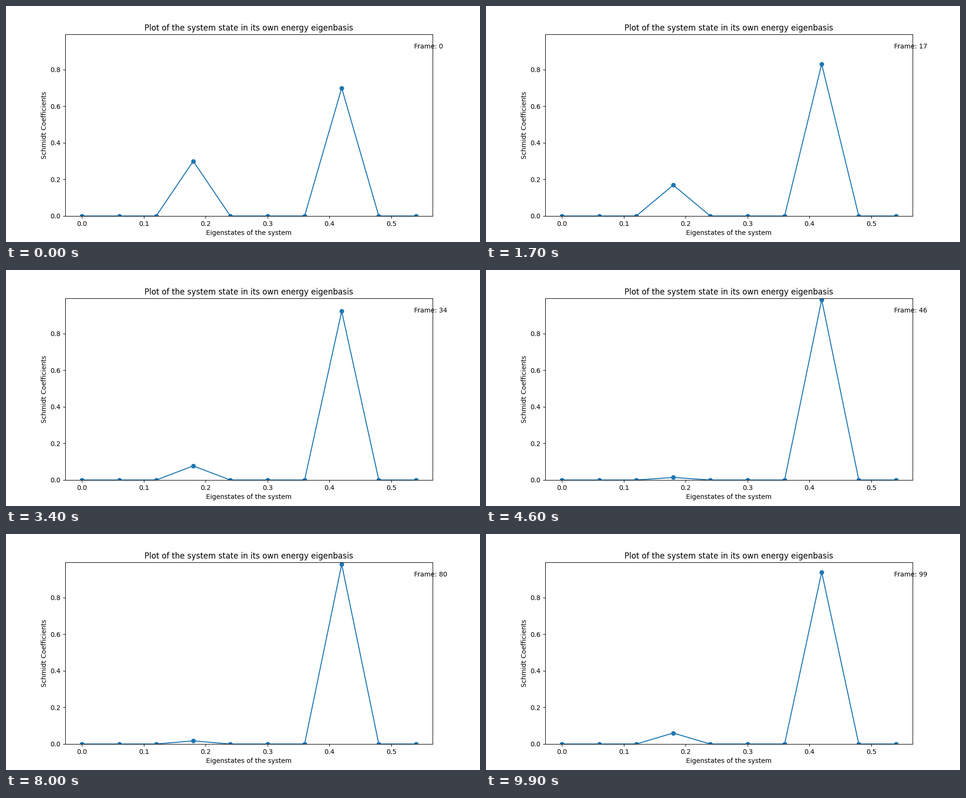
These frames come from a looping animation (1000 px wide and 500 px high, 10000 ms). A matplotlib script:

```python
import numpy as np
import matplotlib.pyplot as plt
from matplotlib.animation import FuncAnimation

FRAMES = 100
LEVELS = 10
GAP = 0.06
LOW, HIGH = 3, 7  # the two occupied eigenstates

# key points of the lower state's population, joined by a smooth curve
TIMES = np.array([0, 11, 17, 34, 46, 50, 60, 65, 74, 80, 99])
POPULATIONS = np.array([0.3, 0.236, 0.1693, 0.0772, 0.0143, 0.0066,
                        0.041, 0.0384, 0.009, 0.0175, 0.0602])
SLOPES = np.gradient(POPULATIONS, TIMES, edge_order=2)
SLOPES[0] = 0  # the state starts at rest


def population(t):
    i = min(np.searchsorted(TIMES, t, side="right"), len(TIMES) - 1)
    h = TIMES[i] - TIMES[i - 1]
    s = (t - TIMES[i - 1]) / h
    ease = s * s * (3 - 2 * s)
    return (POPULATIONS[i - 1] * (1 - ease) + POPULATIONS[i] * ease
            + h * s * (1 - s) * ((1 - s) * SLOPES[i - 1] - s * SLOPES[i]))


def coefficients(t):
    c = np.zeros(LEVELS)
    c[LOW] = population(t)
    c[HIGH] = 1 - c[LOW]
    return c


energies = GAP * np.arange(LEVELS)

fig, ax = plt.subplots(figsize=(10, 5), dpi=100)
line, = ax.plot(energies, coefficients(0), marker="o", color="#1f77b4")
ax.set_ylim(0, 1 - POPULATIONS.min())
ax.set_title("Plot of the system state in its own energy eigenbasis")
ax.set_xlabel("Eigenstates of the system")
ax.set_ylabel("Schmidt Coefficients")
label = ax.text(0.95, 0.95, "Frame: 0", transform=ax.transAxes,
                ha="left", va="top")


def update(t):
    line.set_ydata(coefficients(t))
    label.set_text(f"Frame: {t}")
    return line, label


anim = FuncAnimation(fig, update, frames=FRAMES, interval=100,
                     repeat=True, repeat_delay=0, blit=False)
plt.show()
```
